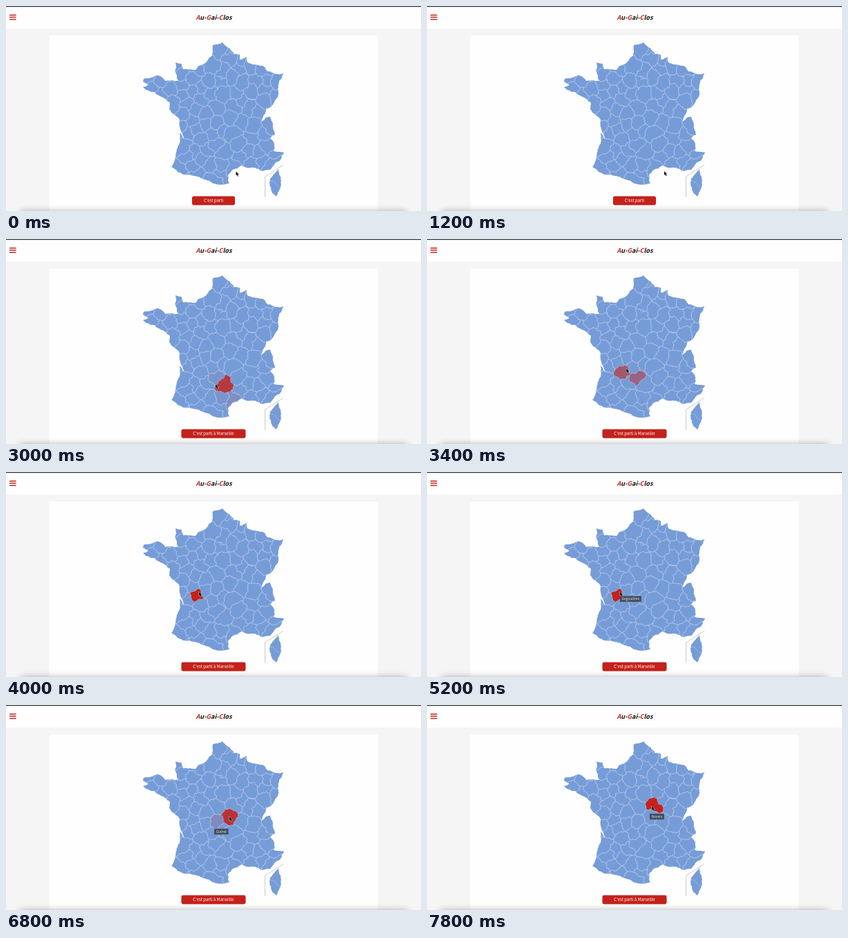
Animation, 600 px wide and 298 px high, one loop 8000 ms. Source, as an HTML page with a canvas:

```html
<!DOCTYPE html>
<html lang="fr">
<head>
<meta charset="utf-8">
<title>Carte</title>
<style>
html, body { margin: 0; width: 100%; height: 100%; overflow: hidden; background: #f5f5f5; }
canvas { display: block; width: 600px; height: 298px; }
</style>
</head>
<body>
<canvas id="stage"></canvas>
<script>
const W = 600, H = 298, LOOP = 8000, STEP = 200, FADE = 260;
const RED = '#c4211b', BLUE = '#769cd8', BORDER = '#c3d3ef';
const FONT = '"Noto Sans CJK JP", "Noto Sans CJK SC", "Noto Sans", sans-serif';

const canvas = document.getElementById('stage');
const ctx = canvas.getContext('2d');
const dpr = window.devicePixelRatio || 1;
canvas.width = W * dpr;
canvas.height = H * dpr;
ctx.scale(dpr, dpr);

// Key points of the coast and borders, clockwise from the north.
const coast = [
  [313, 53], [323, 61], [330, 70], [338, 71], [338, 78], [348, 74], [349, 82], [375, 90],
  [378, 95], [401, 98], [393, 121], [393, 132], [376, 150], [369, 168], [382, 161], [386, 172],
  [389, 187], [382, 192], [388, 201], [387, 211], [402, 213], [398, 222], [382, 238], [370, 240],
  [354, 235], [340, 232], [328, 238], [321, 246], [323, 258], [308, 260], [280, 249], [257, 245],
  [239, 234], [243, 227], [249, 203], [251, 184], [259, 194], [252, 178], [251, 166], [236, 150],
  [237, 141], [224, 132], [203, 122], [198, 118], [206, 115], [198, 110], [199, 106], [220, 101],
  [230, 109], [249, 109], [245, 82], [254, 84], [256, 92], [274, 93], [277, 88], [298, 72], [299, 57]
];
const corsica = [[394, 237], [396, 247], [398, 254], [396, 266], [391, 277], [385, 272], [381, 256], [386, 246]];

// Centres of the departments the pointer crosses.
const stops = [
  [357, 230], [339, 219], [328, 232], [315, 212], [290, 208], [283, 194],
  [275, 180], [290, 173], [304, 171], [324, 163], [330, 147]
];

// Pointer keys: time, x, y.
const pointer = [
  [0, 332.5, 240.5], [1200, 343, 240], [1400, 343, 240], [1700, 356, 230], [2100, 356, 230],
  [2400, 338, 224], [2720, 325, 226], [3000, 303, 211], [3650, 279, 174], [5450, 279, 174],
  [5780, 300, 172], [6400, 301, 172], [6700, 323, 165], [7250, 322, 150], [7800, 325, 147], [LOOP, 325, 147]
];

const tips = [
  { text: 'Angoulême', x: 279, y: 180.3, on: 4600, off: 6200 },
  { text: 'Guéret', x: 301, y: 179.8, on: 6400, off: 7000 },
  { text: 'Nevers', x: 322, y: 158, on: 7600, off: LOOP }
];

const dist = (a, b) => Math.hypot(a[0] - b[0], a[1] - b[1]);

function noise(x, y) {
  const v = Math.sin(Math.round(x) * 12.9898 + Math.round(y) * 78.233) * 43758.5453;
  return (v - Math.floor(v)) * 2 - 1;
}

// Breaks an edge the same way from either end, so neighbours share it.
function bend(a, b, depth, amount, out) {
  const dx = b[0] - a[0], dy = b[1] - a[1];
  if (!depth || Math.hypot(dx, dy) < 2) { out.push(b); return; }
  const side = dx < 0 || (dx === 0 && dy < 0) ? -1 : 1;
  const off = side * amount * noise(a[0] + b[0], a[1] + b[1]);
  const mid = [(a[0] + b[0]) / 2 - dy * off, (a[1] + b[1]) / 2 + dx * off];
  bend(a, mid, depth - 1, amount, out);
  bend(mid, b, depth - 1, amount, out);
}

function roughPath(points, amount) {
  const out = [];
  points.forEach((p, i) => bend(p, points[(i + 1) % points.length], 4, amount, out));
  const path = new Path2D();
  out.forEach(p => path.lineTo(p[0], p[1]));
  path.closePath();
  return path;
}

const land = roughPath(coast, 0.11);
const island = roughPath(corsica, 0.15);
const onLand = p => ctx.isPointInPath(land, p[0] * dpr, p[1] * dpr);

// Fills the land with evenly spread department centres around the stops.
function scatter(gap) {
  const seeds = [...stops];
  let s = 11;
  const random = () => (s = s * 16807 % 2147483647) / 2147483647;
  for (let i = 0; i < 6000; i++) {
    const p = [195 + random() * 210, 50 + random() * 212];
    if (onLand(p) && seeds.every(q => dist(p, q) > gap)) seeds.push(p);
  }
  return seeds;
}

// Keeps the part of a polygon nearer to s than to o.
function nearer(poly, s, o) {
  const nx = o[0] - s[0], ny = o[1] - s[1];
  const c = (o[0] * o[0] + o[1] * o[1] - s[0] * s[0] - s[1] * s[1]) / 2;
  const side = p => p[0] * nx + p[1] * ny - c;
  const out = [];
  poly.forEach((a, i) => {
    const b = poly[(i + 1) % poly.length], da = side(a), db = side(b);
    if (da <= 0) out.push(a);
    if ((da < 0 && db > 0) || (da > 0 && db < 0)) {
      const k = da / (da - db);
      out.push([a[0] + (b[0] - a[0]) * k, a[1] + (b[1] - a[1]) * k]);
    }
  });
  return out;
}

const seeds = scatter(14.3);
const cells = seeds.map(s => {
  let poly = [[150, 0], [450, 0], [450, H], [150, H]];
  seeds.forEach(o => { if (o !== s) poly = nearer(poly, s, o); });
  return roughPath(poly.map(p => p.map(v => Math.round(v * 10) / 10)), 0.24);
});

function pointerAt(t) {
  const i = Math.max(1, pointer.findIndex(p => p[0] > t));
  const [t0, x0, y0] = pointer[i - 1], [t1, x1, y1] = pointer[i];
  const k = Math.max(0, (t - t0) / (t1 - t0));
  return [x0 + (x1 - x0) * k, y0 + (y1 - y0) * k];
}

function hovered(t) {
  const p = pointerAt(t);
  if (!onLand(p)) return -1;
  const gaps = seeds.map(s => dist(s, p));
  return gaps.indexOf(Math.min(...gaps));
}

// A department's glow is its share of the hover time just past.
function glow(t) {
  const share = new Map(), n = 20;
  for (let i = 0; i < n; i++) {
    const id = hovered(t - FADE * i / n);
    if (id >= 0) share.set(id, (share.get(id) || 0) + 1 / n);
  }
  return share;
}

function rect(x, y, w, h, color, r = 0) {
  ctx.fillStyle = color;
  ctx.beginPath();
  ctx.roundRect(x, y, w, h, r);
  ctx.fill();
}

function line(points, color, width) {
  ctx.strokeStyle = color;
  ctx.lineWidth = width;
  ctx.beginPath();
  points.forEach(p => ctx.lineTo(p[0], p[1]));
  ctx.stroke();
}

function drawPage() {
  rect(0, 0, W, H, '#f5f5f5');
  rect(0, 0, W, 33, '#fefefe');
  rect(0, 0, W, 1.2, '#34363a');
  rect(62.5, 43, 475, 255, '#fefefe');
  for (let i = 0; i < 3; i++) rect(5, 12.4 + i * 3.2, 9.7, 1.5, RED, 0.5);

  ctx.font = 'italic 600 9.1px ' + FONT;
  ctx.textAlign = 'left';
  ctx.textBaseline = 'alphabetic';
  const title = 'Au-Gai-Clos';
  let x = 300.5 - ctx.measureText(title).width / 2;
  for (const ch of title) {
    ctx.fillStyle = /[A-Z]/.test(ch) ? RED : '#111';
    ctx.fillText(ch, x, 20.2);
    x += ctx.measureText(ch).width;
  }
}

function drawMap(t) {
  ctx.lineJoin = 'round';
  ctx.fillStyle = BLUE;
  ctx.fill(land);
  ctx.fill(island);

  ctx.save();
  ctx.clip(land);
  ctx.strokeStyle = BORDER;
  ctx.lineWidth = 0.45;
  cells.forEach(c => ctx.stroke(c));
  ctx.beginPath();
  ctx.arc(311, 104.5, 2.4, 0, Math.PI * 2);
  ctx.stroke();
  ctx.fillStyle = RED;
  for (const [id, alpha] of glow(t)) {
    ctx.globalAlpha = alpha;
    ctx.fill(cells[id]);
  }
  ctx.restore();

  line([[381, 254], [387, 255], [391, 260], [397, 265]], BORDER, 0.45);
  line([[374.5, 277.5], [374.5, 248], [401, 231]], '#bdbdbd', 0.8);
}

function drawButton(t) {
  const clicked = t >= 1800;
  const w = clicked ? 93 : 62;
  rect(300 - w / 2, 276.6, w, 12.8, RED, 2.4);
  ctx.font = '500 6px ' + FONT;
  ctx.textAlign = 'center';
  ctx.fillStyle = '#fff';
  ctx.fillText("C'est parti" + (clicked ? ' à Marseille' : ''), 300, 285.3);
}

function drawTip(tip) {
  ctx.font = '4.8px ' + FONT;
  ctx.textAlign = 'left';
  rect(tip.x, tip.y, ctx.measureText(tip.text).width + 5.5, 8.4, 'rgba(66, 72, 82, 0.93)', 0.5);
  ctx.fillStyle = '#e6e8ec';
  ctx.fillText(tip.text, tip.x + 2.75, tip.y + 5.9);
}

const arrow = new Path2D('M0 0V6L1.4 4.8L2.4 7.2L3.5 6.7L2.5 4.4H4.3Z');
function drawPointer(t) {
  ctx.save();
  ctx.translate(...pointerAt(t));
  ctx.strokeStyle = 'rgba(255, 255, 255, 0.85)';
  ctx.lineWidth = 0.9;
  ctx.stroke(arrow);
  ctx.fillStyle = '#0b0b0b';
  ctx.fill(arrow);
  ctx.restore();
}

// Soft shadow cast by a panel just below the stage.
function drawFooter() {
  ctx.save();
  ctx.shadowColor = 'rgba(0, 0, 0, 0.3)';
  ctx.shadowBlur = 10 * dpr;
  rect(20, H, W - 40, 20, '#ccc', 4);
  ctx.restore();
}

const start = performance.now();
function frame() {
  const elapsed = (performance.now() - start) % LOOP;
  const t = Math.floor(elapsed / STEP) * STEP;
  drawPage();
  drawMap(t);
  drawButton(t);
  tips.filter(p => t >= p.on && t < p.off).forEach(drawTip);
  drawPointer(t);
  drawFooter();
  requestAnimationFrame(frame);
}
frame();
</script>
</body>
</html>
```
